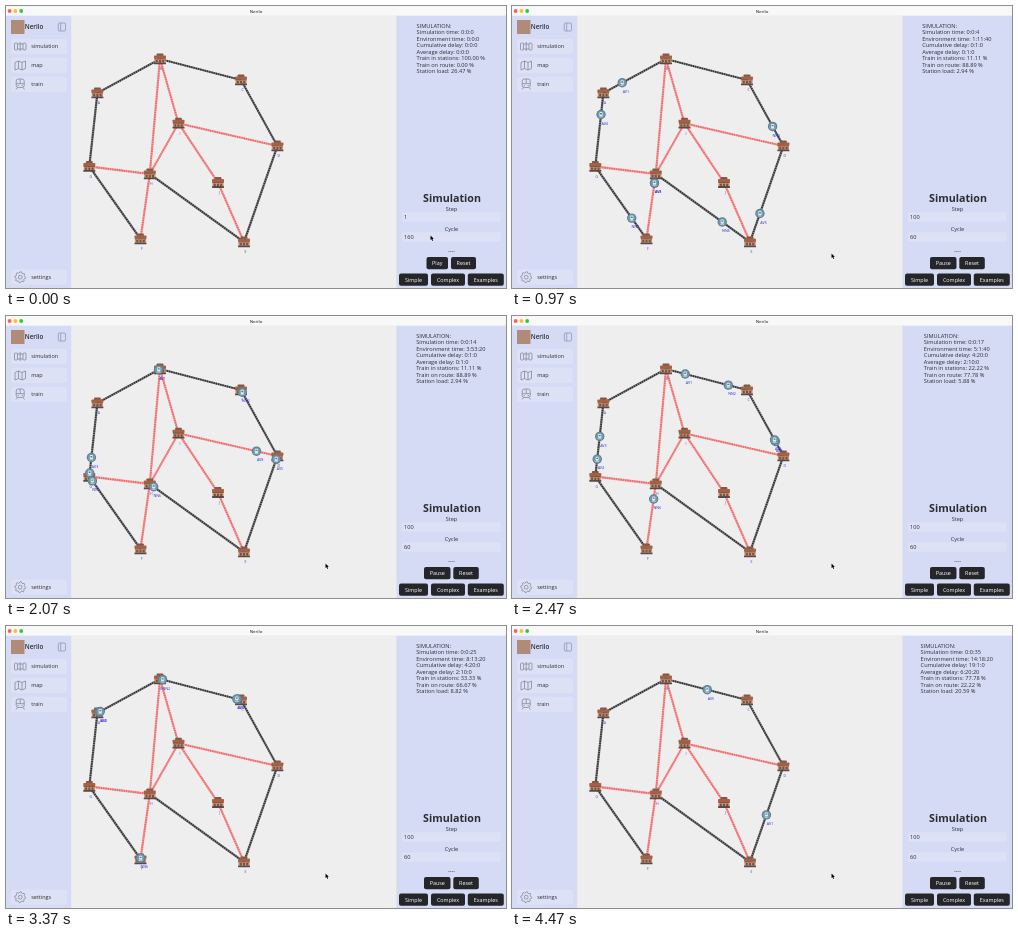
Recreate the animation shown at these times as an HTML page with a canvas. Size 500 px wide and 282 px high, loop 4.57 s.

```html
<!DOCTYPE html>
<html lang="en">
<head>
<meta charset="utf-8">
<title>Nerilo</title>
<style>
html, body { margin: 0; width: 100%; height: 100%; overflow: hidden; background: #eee; }
canvas { display: block; width: 500px; height: 282px; }
</style>
</head>
<body>
<canvas id="stage"></canvas>
<script>
const W = 500, H = 282, BAR = 9.4, LOOP = 4570;
const canvas = document.getElementById('stage');
const ctx = canvas.getContext('2d');
const scale = Math.max(1, window.devicePixelRatio || 1);
canvas.width = W * scale;
canvas.height = H * scale;

const FONT = '"Open Sans", "Noto Sans", sans-serif';
const PANEL = '#d5daf5', FIELD = '#dde1f5', INK = '#2c2e33', GREY = '#858a9c';

const stations = {
  A: [91.4, 87], B: [154, 53], C: [235, 74], D: [271.4, 140], E: [238, 236],
  F: [134.5, 233], G: [83.3, 160.5], H: [143.8, 168], I: [172.5, 117.3], J: [212, 176.7]
};
const slowRails = ['AB', 'BC', 'CD', 'DE', 'EH', 'AG', 'GF'];
const fastRails = ['BH', 'BI', 'IH', 'ID', 'IJ', 'JE', 'GH', 'HF'];

// Each leg: route, departure, arrival, in hundreds of simulated seconds
const trains = [
  ['AV1', ['AB', 0, 143], ['BC', 143, 303], ['CD', 303, 432], ['DE', 432, 595]],
  ['AV4', ['AG', 0, 147], ['GA', 147, 291], ['AB', 291, 452]],
  ['AV3', ['FH', 0, 50], ['HG', 50, 103], ['GA', 103, 246], ['AB', 289, 443]],
  ['AV8', ['FH', 0, 50], ['HI', 50, 99], ['ID', 99, 151], ['DC', 151, 288], ['CB', 288, 443]],
  ['NN1', ['FG', 0, 149]],
  ['NN6', ['EH', 0, 146], ['HF', 146, 298]],
  ['AV5', ['ED', 0, 145], ['DC', 145, 293], ['CB', 436, 597]],
  ['NN2', ['DC', 0, 145], ['CB', 145, 301]],
  ['NN3']
];

const clockKeys = [[5, 0], [10, 43], [15, 87], [21, 140], [29, 222], [39, 370], [45, 515]];
const pointerKeys = [[0, 425, 230], [3, 408, 211], [5, 431, 257], [8, 320, 248]];
// Start, total delay in seconds, late trains
const delays = [[0, 0, 1], [1, 60, 1], [180, 15600, 2], [300, 40140, 3], [450, 68460, 3]];

function at(keys, t, k = 1) {
  if (t <= keys[0][0]) return keys[0][k];
  for (let i = 1; i < keys.length; i++) {
    const a = keys[i - 1], b = keys[i];
    if (t <= b[0]) return a[k] + (b[k] - a[k]) * (t - a[0]) / (b[0] - a[0]);
  }
  return keys[keys.length - 1][k];
}

const hms = s => [Math.floor(s / 3600), Math.floor(s / 60) % 60, Math.floor(s % 60)].join(':');
const pct = v => (v * 100).toFixed(2) + ' %';

function text(str, x, y, size, color = INK, align = 'left', weight = 400) {
  ctx.font = `${weight} ${size}px ${FONT}`;
  ctx.textAlign = align;
  ctx.fillStyle = color;
  ctx.fillText(str, x, y);
}

function rect(x, y, w, h, color, r = 0) {
  ctx.fillStyle = color;
  ctx.beginPath();
  ctx.roundRect(x, y, w, h, r);
  ctx.fill();
}

function dot(x, y, r, color) {
  ctx.fillStyle = color;
  ctx.beginPath();
  ctx.arc(x, y, r, 0, 7);
  ctx.fill();
}

function box(x, y, w, h, r = 1) {
  ctx.beginPath();
  ctx.roundRect(x, y, w, h, r);
  ctx.stroke();
}

function lines(...paths) {
  ctx.beginPath();
  for (const p of paths) {
    for (let i = 0; i < p.length; i += 2) ctx[i ? 'lineTo' : 'moveTo'](p[i], p[i + 1]);
  }
  ctx.stroke();
}

// Soft bed with beaded sleepers
function rail(route, color, bed) {
  const path = [...stations[route[0]], ...stations[route[1]]];
  ctx.strokeStyle = bed;
  ctx.lineWidth = 2.3;
  lines(path);
  ctx.strokeStyle = color;
  ctx.lineWidth = 1.7;
  ctx.setLineDash([1.5, 0.8]);
  lines(path);
  ctx.setLineDash([]);
}

function station(name) {
  const [x, y] = stations[name];
  rect(x - 3.4, y - 5.6, 6.8, 2.6, '#7d5b4c', 0.8);
  rect(x - 6, y - 3.6, 12, 3.4, '#a86045', 0.8);
  rect(x - 5.6, y - 0.2, 11.2, 3.8, '#c99576');
  rect(x - 5.6, y - 0.5, 11.2, 0.8, '#6b4a3d');
  for (const dx of [-4.2, -1, 2.2]) rect(x + dx, y + 1, 2, 2.4, '#77503f');
  rect(x - 6, y + 3.4, 12, 1.9, '#5a4a44', 0.4);
  text(name, x + 1.5, y + 11.3, 3.5, '#4040d8', 'center');
}

function train(name, x, y) {
  dot(x, y, 4.7, '#587d92');
  dot(x, y, 3.8, '#7499ac');
  rect(x - 1.6, y - 2.5, 3.2, 4.2, '#e3ebef', 1);
  rect(x - 1, y - 1.5, 2, 1.4, '#587d92', 0.3);
  rect(x - 1.9, y + 2.1, 3.8, 0.6, '#d5e0e6');
  text(name, x + 3.7, y + 10.2, 3.7, '#2c2ce0', 'center');
}

function sidebar() {
  rect(0, BAR, 65.2, H - BAR, PANEL);
  rect(5, 14, 13.5, 14, '#b08c78');
  text('Nerilo', 18.8, 23.4, 6.3, INK, 'left', 600);
  ctx.strokeStyle = '#8c91a6';
  ctx.lineWidth = 0.7;
  box(52.3, 17, 7.2, 8);
  lines([54.7, 17, 54.7, 25]);

  const rows = [['simulation', 40.4], ['map', 59.3], ['train', 78.3], ['settings', 271.2]];
  for (const [name, y] of rows) {
    rect(5, y - 7.6, 56, 15.2, FIELD, 2.5);
    text(name, 25.2, y + 2, 5.5);
  }

  ctx.strokeStyle = GREY;
  ctx.lineWidth = 0.8;
  box(8.5, 37, 3, 7);
  box(17, 37, 3, 7);
  lines([11.5, 38, 17, 38], [11.5, 43, 17, 43], [14.2, 36, 14.2, 45]);
  lines([9, 56.5, 12.5, 55, 16, 56.5, 19.5, 55, 19.5, 62.5, 16, 64, 12.5, 62.5, 9, 64, 9, 56.5],
    [12.5, 55, 12.5, 62.5], [16, 56.5, 16, 64]);
  box(10.2, 73, 8, 8.5, 2);
  lines([10.2, 77.7, 18.2, 77.7], [14.2, 73, 14.2, 77.7], [11.5, 81.5, 10, 83.5], [17, 81.5, 18.5, 83.5]);
  dot(12.2, 79.6, 0.6, GREY);
  dot(16.2, 79.6, 0.6, GREY);

  ctx.beginPath();
  for (let i = 0; i <= 32; i++) {
    const a = i * Math.PI / 16, r = i % 4 < 2 ? 5.5 : 4.3;
    ctx.lineTo(14.2 + r * Math.cos(a), 271.2 + r * Math.sin(a));
  }
  ctx.stroke();
  ctx.beginPath();
  ctx.arc(14.2, 271.2, 1.9, 0, 7);
  ctx.stroke();
}

function button(label, x, y, w) {
  rect(x, y, w, 12.2, '#25262a', 2);
  text(label, x + w / 2, y + 8, 5.4, '#fff', 'center');
}

function input(label, value, y) {
  text(label, 445.5, y - 1.2, 5.5, INK, 'center');
  rect(396, y + 0.3, 98.5, 9.4, FIELD, 1.5);
  text(value, 398, y + 7, 5.6);
}

function panel(n, clock, riding) {
  rect(390.4, BAR, W - 390.4, H - BAR, PANEL);
  const parked = trains.length - riding;
  const [, late, count] = delays.filter(d => clock >= d[0]).pop();
  const rows = [
    'SIMULATION:',
    'Simulation time: ' + hms(Math.max(0, Math.floor((n - 5) * 0.88))),
    'Environment time: ' + hms(clock * 100),
    'Cumulative delay: ' + hms(late),
    'Average delay: ' + hms(late / count),
    'Train in stations: ' + pct(parked / trains.length),
    'Train on route: ' + pct(riding / trains.length),
    'Station load: ' + pct(parked / 34)
  ];
  ctx.font = `400 5.65px ${FONT}`;
  const wide = Math.max(...rows.map(r => ctx.measureText(r).width));
  rows.forEach((r, i) => text(r, 444.8 - wide / 2, 22 + i * 6.43, 5.65));

  text('Simulation', 446, 195.8, 10.7, INK, 'center', 700);
  input('Step', n < 3 ? '1' : '100', 206);
  input('Cycle', n < 1 ? '160' : '60', 226);
  text('----', 445.5, 246.8, 5.6, INK, 'center');
  if (n < 6) {
    button('Play', 420.5, 251, 21.5);
    button('Reset', 445, 251, 25);
  } else {
    button('Pause', 418, 251, 26.5);
    button('Reset', 447.3, 251, 25.5);
  }
  button('Simple', 393, 267.6, 29);
  button('Complex', 425, 267.6, 34);
  button('Examples', 461.8, 267.6, 36);
}

function titleBar() {
  rect(0, 0, W, BAR, '#f8f8f8');
  ['#fb5f57', '#fdbc2e', '#29c840'].forEach((c, i) => dot(3.6 + i * 5.8, 5, 1.9, c));
  text('Nerilo', 250, 6.6, 4.3, '#444', 'center', 600);
}

function pointer(x, y) {
  ctx.beginPath();
  [[0, 0], [0, 4.6], [1.1, 3.7], [1.9, 5.4], [2.7, 5], [1.9, 3.4], [3.3, 3.3]]
    .forEach(p => ctx.lineTo(x - 0.5 + p[0], y - 0.5 + p[1]));
  ctx.closePath();
  ctx.strokeStyle = '#fff';
  ctx.lineWidth = 0.7;
  ctx.stroke();
  ctx.fillStyle = '#000';
  ctx.fill();
}

function draw(ms) {
  const n = ms < 570 ? Math.min(5, Math.floor(ms / 100)) : 6 + Math.floor((ms - 570) / 100);
  const clock = Math.round(at(clockKeys, n));
  ctx.setTransform(scale, 0, 0, scale, 0, 0);
  rect(0, 0, W, H, '#eeeeee');

  slowRails.forEach(r => rail(r, '#303030', '#8a8a8a'));
  fastRails.forEach(r => rail(r, '#f26464', '#f3aaaa'));
  Object.keys(stations).forEach(station);

  let riding = 0;
  for (const [name, ...legs] of trains) {
    const leg = legs.find(l => clock > l[1] && clock <= l[2]);
    if (!leg) continue;
    riding++;
    const [route, start, end] = leg;
    const a = stations[route[0]], b = stations[route[1]];
    const p = (clock - start) / (end - start);
    train(name, a[0] + (b[0] - a[0]) * p, a[1] + (b[1] - a[1]) * p);
  }

  sidebar();
  panel(n, clock, riding);
  titleBar();
  pointer(at(pointerKeys, n, 1), at(pointerKeys, n, 2));
}

const begin = performance.now();
function tick() {
  draw((performance.now() - begin) % LOOP);
  requestAnimationFrame(tick);
}
tick();
</script>
</body>
</html>
```
